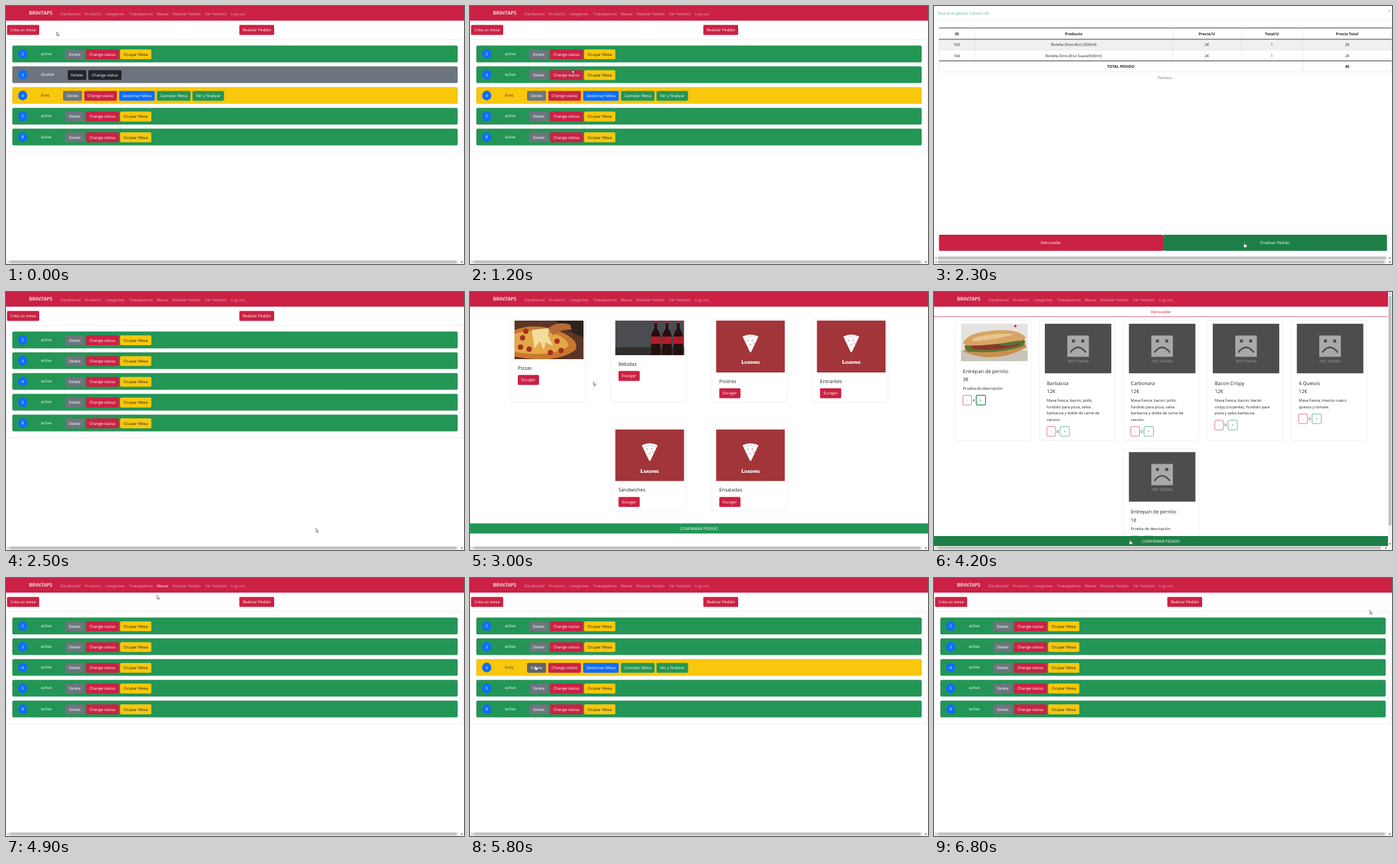
Write an HTML page that moves like this. It is 690x388 px and loops after 6.9 s.

```html
<!DOCTYPE html>
<html lang="es">
<head>
<meta charset="utf-8">
<title>Mesas</title>
<style>
html, body { margin: 0; width: 100%; height: 100%; overflow: hidden; background: #fff; }
svg { display: block; }
#stage { width: 690px; height: 388px; }
text { font-family: "Open Sans", "Noto Sans", sans-serif; text-rendering: geometricPrecision; white-space: pre; }
</style>
</head>
<body>
<svg id="stage" viewBox="0 0 690 388"></svg>
<script>
const LOOP = 6900, STEP = 100;
const RED = '#cb2144', GREEN = '#239655', YELLOW = '#f9c70c', GREY = '#6c757d', BLUE = '#0d6efd', INK = '#212529';
const DARKER = { [RED]: '#a81a38', [GREEN]: '#1d7f47', [YELLOW]: '#e0b30a', [GREY]: '#5c636a', [BLUE]: '#0b5ed7', [INK]: '#424649' };

// pointer path: time, x, y
const PATH = [
  [0, 76.5, 39], [100, 70, 36], [200, 20, 70], [300, 20, 190], [400, 120, 305], [500, 290, 280],
  [600, 321, 139], [700, 228, 145], [900, 175, 112], [1000, 154, 96], [1200, 154, 96], [1500, 305, 134],
  [1700, 305, 134], [1900, 380, 280], [2100, 467, 355.5], [2500, 467, 355.5], [2700, 272, 10], [2800, 272, 10],
  [3000, 186, 135], [3200, 88, 132], [3300, 88, 132], [3400, 70, 160], [3800, 70, 160], [4200, 294.5, 372],
  [4300, 294.5, 372], [4400, 235, 10], [4600, 235, 10], [4900, 227.5, 26], [5100, 195, 133], [5300, 195, 133],
  [5400, 150, 190], [5600, 22, 160], [5700, 22, 130], [6000, 250, 133], [6100, 407, 38], [6400, 407, 38],
  [6500, 450, 42], [6800, 656.5, 48.5], [LOOP, 656.5, 48.5]
];

// page shown from each time on
const PAGES = [[0, tables], [1700, order], [2500, tables], [2800, categories], [3300, products], [4300, categories], [4500, tables]];

let mouse, hot;

function pointer(t) {
  const i = PATH.findIndex(p => p[0] > t);
  const [a, ax, ay] = PATH[i - 1], [b, bx, by] = PATH[i];
  const k = (t - a) / (b - a);
  return { x: ax + (bx - ax) * k, y: ay + (by - ay) * k };
}

const over = (x, y, w, h) => mouse.x >= x && mouse.x <= x + w && mouse.y >= y && mouse.y <= y + h;
const rect = (x, y, w, h, fill, more = '') => `<rect x="${x}" y="${y}" width="${w}" height="${h}" fill="${fill}" ${more}/>`;
const line = (x1, y1, x2, y2, color, w = .5) => `<path d="M${x1} ${y1}L${x2} ${y2}" stroke="${color}" stroke-width="${w}"/>`;
const shape = (d, fill, more = '') => `<path d="${d}" fill="${fill}" ${more}/>`;
const text = (x, y, s, fill = INK, size = 5.95, more = '') => `<text x="${x}" y="${y}" fill="${fill}" font-size="${size}" ${more}>${s}</text>`;
const mid = (x, y, s, fill, size, more = '') => text(x, y, s, fill, size, 'text-anchor="middle" ' + more);
const bold = 'font-weight="700"';
const frame = (x, y, w, h, s) => `<svg x="${x}" y="${y}" width="${w}" height="${h}">${s}</svg>`;

function button(x, y, w, h, label, color, ink = '#fff', r = 1.6) {
  const on = over(x, y, w, h);
  hot = hot || on;
  return rect(x, y, w, h, on ? DARKER[color] : color, `rx="${r}"`) + mid(x + w / 2, y + h / 2 + 2.1, label, ink);
}

function nav(lit) {
  const items = [['Dashboard', 82, 30], ['Products', 118.5, 25], ['Categories', 149.5, 30], ['Trabajadores', 185.5, 36],
    ['Mesas', 227, 18], ['Realizar Pedido', 251, 43], ['Ver Pedidos', 300, 33], ['Log out', 339, 22]];
  return rect(0, 0, 690, 22, RED) + text(34.5, 13.2, 'BRINTAPS', '#fff', 7.5, 'font-weight="600"') +
    items.map(([s, x, w]) => {
      const on = over(x, 5, w, 13);
      hot = hot || on;
      return text(x, 13.7, s, on || s === lit ? '#fff' : '#e8a0b0', 5.9);
    }).join('');
}

function scrollX(y = 382, end = 690, thumb = 673) {
  const c = y + 3;
  return rect(0, y, end, 6, '#f4f4f4') + rect(6, y + .7, thumb, 4.4, '#c1c1c1') +
    shape(`M2 ${c}l2-1.3v2.6z`, '#777') + shape(`M${end - 2} ${c}l-2-1.3v2.6z`, '#333');
}

function tableRow(i, id, state) {
  const y = 59.6 + i * 31.22, by = y + 5.6;
  const fill = { active: GREEN, disable: GREY, busy: YELLOW }[state];
  const edge = { active: '#1b8148', disable: '#5d656c', busy: '#dcae08' }[state];
  const sets = {
    active: [[89, 29, 'Delete', GREY], [120.5, 49.5, 'Change status', RED], [172, 47, 'Ocupar Mesa', YELLOW, INK]],
    disable: [[93, 28, 'Delete', INK], [124, 50, 'Change status', INK]],
    busy: [[86, 28.5, 'Delete', GREY], [118, 49, 'Change status', RED], [170.5, 53.5, 'Gestionar Mesa', BLUE],
      [227.5, 50.5, 'Cancelar Mesa', GREEN], [281, 47.5, 'Ver y finalizar', GREEN]]
  };
  return rect(9.8, y + .2, 670.4, 24.6, fill, `rx="1.5" stroke="${edge}" stroke-width=".5"`) +
    `<ellipse cx="25.2" cy="${y + 12.6}" rx="6.9" ry="7.3" fill="${BLUE}"/>` + mid(25.2, y + 14.8, id, '#fff') +
    text(52.5, y + 14.2, state, state === 'busy' ? '#4d4213' : '#fff') +
    sets[state].map(([x, w, s, c, ink]) => button(x, by, w, 14.8, s, c, ink)).join('');
}

function tables(t) {
  const busy = t < 1700 || (t >= 5200 && t < 6300);
  const states = ['active', t < 1200 ? 'disable' : 'active', busy ? 'busy' : 'active', 'active', 'active'];
  return nav(t >= 4500 && t < 5100 ? 'Mesas' : '') +
    button(1.5, 28.5, 48.5, 15, 'Crea un mesa', RED) + button(351.5, 28.5, 52.5, 15, 'Realizar Pedido', RED) +
    rect(.3, 50.3, 689.4, 169.2, '#fff', 'rx="1.5" stroke="#dedede" stroke-width=".5"') +
    states.map((s, i) => tableRow(i, [2, 3, 4, 5, 8][i], s)).join('') + scrollX();
}

function order() {
  const teal = '#5cb79d', cols = [34.5, 210.5, 411, 509, 622.5];
  const cells = (y, list, more) => list.map((s, i) => mid(cols[i], y, s, INK, 5.8, more)).join('');
  const edges = [7.5, 61.5, 359.5, 463.5, 555.5, 689.5];
  return text(6, 13.4, 'Este es el pedido número 69', teal, 5.8) + mid(686, 9, 'x', teal, 6.4) +
    line(0, 21.7, 690, 21.7, '#e4e4e4') + rect(7.5, 50, 682, 16.3, '#f0f0f0') +
    edges.map((x, i) => line(x, 33, x, i % 4 && i < 5 ? 82.5 : 99, '#d5d8db')).join('') + line(555.5, 82, 555.5, 99, '#d5d8db') +
    line(7.5, 66.3, 689.5, 66.3, '#d5d8db') + line(7.5, 99, 689.5, 99, '#d5d8db') +
    [33, 50, 82.6].map(y => line(7.5, y, 689.5, y, INK, .9)).join('') +
    cells(44, ['ID', 'Producto', 'Precio/U', 'Total/U', 'Precio Total'], bold) +
    cells(60.3, ['165', 'Botella Zimo-Brul (500ml)', '2€', '1', '2€']) +
    cells(76.7, ['166', 'Botella Zimo-Brul Suave(500ml)', '2€', '1', '2€']) +
    mid(281.5, 93.2, 'TOTAL PEDIDO', INK, 5.8, bold) + mid(622.5, 93.2, '4€', INK, 5.8, bold) +
    mid(348, 109.5, 'Pedidos', '#777d83', 5.9) + line(0, 337, 690, 337, '#f6f6f6') +
    button(7.5, 344, 337.5, 24.2, 'Retroceder', RED) + button(345, 344, 337.5, 24.2, 'Finalizar Pedido', GREEN) +
    scrollX(376, 690, 675) + scrollX();
}

const pizza = () => rect(0, 0, 104, 58, '#5b3626') + shape('M62 0H104V25Q80 18 62 0', '#2f211d') +
  shape('M0 14Q34 2 72 18Q98 30 92 44Q62 66 0 54Z', '#c9772e') + shape('M0 20Q36 9 66 22Q84 31 80 40Q50 56 0 47Z', '#e3a748') +
  shape('M26 14L54 11 50 22 58 38 47 33 44 44 38 31 30 42Z', '#f3dc9c') +
  [[12, 26], [22, 43], [64, 31], [70, 45], [9, 40], [54, 48], [17, 16]].map(([x, y]) => `<circle cx="${x}" cy="${y}" r="4" fill="#a5301f"/>`).join('') +
  shape('M50 12Q64 0 84 6L86 14Q70 12 58 22Z', '#b86a36');

const bottle = x => shape(`M${x - 2} 1h4v11q5 6 5 14v26h-14v-26q0-8 5-14z`, '#24100f') + rect(x - 7, 24, 14, 11, '#b8192b') + rect(x - 2, 0, 4, 4, '#c22331');
const drinks = () => rect(0, 0, 104, 52, '#4a4c50') + shape('M0 40H104V52H0Z', '#302d2c') + [61, 78, 95].map(bottle).join('');

const loading = () => rect(0, 0, 104, 78, '#a23539', 'rx="1"') +
  shape('M40 24Q52 18 64 24L53 47Q52 48 51 47Z', '#fff') + shape('M41.5 27Q52 22 62.5 27', 'none', 'stroke="#d8cfcf" stroke-width=".9"') +
  [[48, 30], [55, 29.5], [52, 36.5], [57, 34]].map(([x, y]) => `<circle cx="${x}" cy="${y}" r="1.7" fill="#dccfd0"/>`).join('') +
  mid(52, 65, '<tspan font-size="8">L</tspan>OADING', '#fff', 5.6, 'font-weight="800"');

const sandwich = () => rect(0, 0, 101, 57, '#e5e3df') + rect(0, 40, 101, 17, '#c9c4bb') +
  shape('M4 42Q50 62 99 36L96 27 8 33Z', '#c98f4c') + shape('M5 34Q18 25 38 29T70 23 97 26L94 34Q60 46 10 42Z', '#5c7434') +
  shape('M14 34Q40 28 60 32T90 27L86 33Q50 42 18 38Z', '#8d3529') + shape('M3 29Q10 14 44 11Q84 6 97 20Q98 26 84 26Q40 34 8 33Z', '#d7a562') +
  shape('M16 23Q42 13 80 16Q60 23 20 27Z', '#e8c58c') + '<circle cx="82" cy="3.8" r="1.8" fill="#c3203c"/>';

const missing = () => rect(0, 0, 100.5, 75, '#4d4d4d') + rect(34, 18, 32.5, 32, '#a9a9a9') +
  rect(41, 24, 4.5, 4.5, '#4d4d4d') + rect(55, 24, 4.5, 4.5, '#4d4d4d') +
  shape('M38.5 43.5Q50 28 62 43.5', 'none', 'stroke="#4d4d4d" stroke-width="2.4"') +
  mid(50.2, 58.4, 'NOT FOUND', '#a9a9a9', 5.4);

const card = (x, y, w, h) => rect(x, y, w, h, '#fff', 'rx="1.5" stroke="#e0e0e0" stroke-width=".5"');
const heading = (x, y, s) => text(x, y, s, INK, 7.4, 'font-weight="500"');

function categories() {
  const list = [[60.5, 41, 'Pizzas', 58, pizza], [212.2, 41, 'Bebidas', 52, drinks], [364, 41, 'Postres', 78, loading],
    [515.8, 41, 'Entrantes', 78, loading], [212.2, 204.5, 'Sándwiches', 78, loading], [364, 204.5, 'Ensaladas', 78, loading]];
  return nav() + list.map(([x, y, s, h, art]) => card(x, y, 114, 124.5) + frame(x + 6.6, y + 2, 103.8, h, art()) +
    heading(x + 11.5, y + h + 17.6, s) + button(x + 11.5, y + h + 25.7, 32, 15, 'Escoger', RED)).join('') +
    button(0, 348, 690, 15.2, 'CONFIRMAR PEDIDO', GREEN, '#fff', 0) + scrollX();
}

function product(x, y, name, price, lines, count, art = missing, h = 75) {
  const tx = x + 11.3, ty = y + h + 22.3, by = ty + 52.9 + (lines.length - 3) * 9.5;
  const box = (bx, w, s, color, focus) => {
    const on = over(bx, by, w, 14.5);
    hot = hot || on;
    return rect(bx, by, w, 14.5, '#fff', `rx="1.6" stroke="${color}" stroke-width="${focus ? 1.2 : .6}"`) + mid(bx + w / 2, by + 9.3, s, color);
  };
  return card(x, y, 113.7, 180.5) + frame(x + 8.2, y + 4.8, 100.5, h, art()) + heading(tx, ty, name) + heading(tx, ty + 12.4, price) +
    lines.map((s, i) => text(tx, ty + 25 + i * 9.5, s, INK, 5.75)).join('') +
    box(tx, 13, '-', RED) + mid(tx + 16.4, by + 9.2, count) + box(tx + 20, 14, '+', '#1f8a4e', count > 0);
}

function products(t) {
  const count = Math.max(0, Math.min(4, Math.floor((t - 3400) / STEP)));
  const long = ['Masa fresca, bacon, pollo,', 'fundido para pizza, salsa', 'barbacoa y doble de carne de', 'vacuno.'];
  const crispy = ['Masa fresca, bacon, bacon', 'crispy (crujiente), Fundido para', 'pizza y salsa barbacoa.'];
  const note = ['Prueba de descripción'];
  return nav() + mid(342, 32, 'Retroceder', RED) + line(0, 37, 684, 37, RED, .7) +
    product(32.3, 42.7, 'Entrepan de pernilo', '3€', note, count, sandwich, 56.5) +
    product(158.7, 42.7, 'Barbacoa', '12€', long, 0) + product(285.2, 42.7, 'Carbonara', '12€', long, 0) +
    product(411.7, 42.7, 'Bacon Crispy', '12€', crispy, 0) +
    product(538.2, 42.7, '4 Quesos', '12€', ['Masa fresca, mezcla cuatro', 'quesos y tomate.'], 0) +
    product(285.2, 235.8, 'Entrepan de pernilo', '1€', note, 0) +
    button(0, 367, 684, 15, 'CONFIRMAR PEDIDO', GREEN, '#fff', 0) +
    rect(684, 0, 6, 388, '#f4f4f4') + rect(684.8, 6, 4.4, 345, '#c1c1c1') +
    shape('M687 2l1.3 2h-2.6z', '#777') + shape('M687 380l1.3-2h-2.6z', '#333') + scrollX(382, 684, 667);
}

function cursor() {
  const at = `transform="translate(${mouse.x} ${mouse.y})" stroke="#222" stroke-width=".5" stroke-linejoin="round"`;
  return hot
    ? shape('M0 .6Q.7-.3 1.3.6V3L4 3.6Q4.6 4 4.4 5.2L3.8 7.7H.5L-1.3 5Q-1.2 4 0 4.8Z', '#fff', at)
    : shape('M0 0V5.6L1.3 4.4 2.2 6.5 3.1 6.1 2.2 4.1H3.9Z', '#fff', at);
}

const stage = document.getElementById('stage');
let shown = -1;

function tick() {
  const t = Math.floor(performance.now() % LOOP / STEP) * STEP;
  if (t !== shown) {
    shown = t;
    hot = false;
    mouse = pointer(t);
    const page = PAGES.filter(p => p[0] <= t).pop()[1];
    stage.innerHTML = page(t) + cursor();
  }
  requestAnimationFrame(tick);
}
tick();
</script>
</body>
</html>
```
